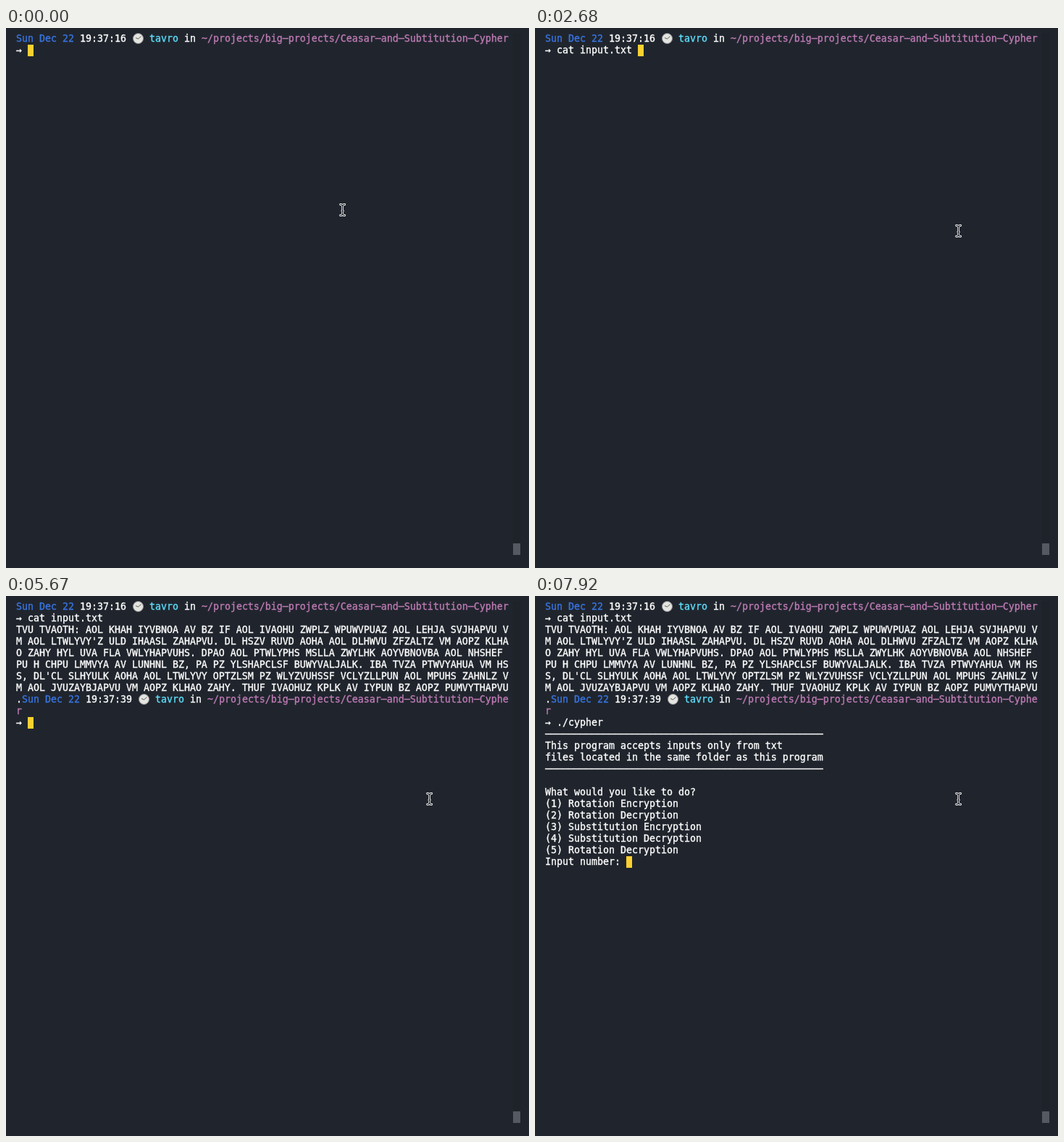
Write an HTML page that moves like this. It is 722x745 px and loops after 8000 ms.

```html
<!DOCTYPE html>
<html lang="en">
<head>
<meta charset="utf-8">
<title>Terminal</title>
<style>
  html, body { margin: 0; width: 100%; height: 100%; overflow: hidden; background: #20252d; }
  pre {
    position: absolute; left: 14px; top: 7px; margin: 0; color: #fff;
    font: 13.29px/16px "DejaVu Sans Mono", monospace;
    font-variant-ligatures: none;
    -webkit-text-stroke: .35px currentColor;
  }
  pre svg { vertical-align: top; }
  .date { color: #3875e0; }
  .user { color: #5cdcfa; }
  .path { color: #bd7ab4; }
  .dash { position: relative; top: -1px; }
  #cursor { position: absolute; width: 8px; height: 16px; background: #fdd031; }
  #track { position: absolute; left: 700px; top: 7px; width: 10px; height: 720px; background: #1e232a; }
  #thumb { position: absolute; left: 0; top: 704px; width: 10px; height: 16px; background: #555961; }
  #mouse { position: absolute; left: 0; top: 0; }
</style>
</head>
<body>
<pre id="screen"></pre>
<div id="cursor"></div>
<div id="track"><div id="thumb"></div></div>
<svg id="mouse" width="10" height="18" fill="none" stroke-linecap="round">
  <defs>
    <path id="beam" d="M1.6 1.5Q4.6 1.5 4.6 4V14Q4.6 16.5 1.6 16.5M7.6 1.5Q4.6 1.5 4.6 4M4.6 14Q4.6 16.5 7.6 16.5M3.9 10.5H5.3"/>
  </defs>
  <use href="#beam" stroke="#fff" stroke-width="2.8"/>
  <use href="#beam" stroke="#15181d" stroke-width="1.1"/>
</svg>
<script>
const LOOP = 8000, CELL = 8, ROW = 16, LEFT = 14, TOP = 7;
const $ = id => document.getElementById(id);

const clock = `<svg width="16" height="16"><circle cx="8.5" cy="7.5" r="7" fill="#e4e4e0" stroke="#8d8f91"/>
<path d="M5 6.5L8.5 8L12.5 4.5" fill="none" stroke="#5a5a5a"/></svg>`;
const span = (name, text) => `<span class="${name}">${text}</span>`;
const prompt = (time, path) =>
  `${span("date", "Sun Dec 22")} ${time} ${clock} ${span("user", "tavro")} in ${span("path", path)}\n→ `;

const dash = span("dash", "–");
const path = "~/projects/big-projects/Ceasar-and-Subtitution-Cypher".replaceAll("-", dash);
const rule = span("dash", "–".repeat(48));
const first = prompt("19:37:16", path);
const second = `${first}cat input.txt
TVU TVAOTH: AOL KHAH IYVBNOA AV BZ IF AOL IVAOHU ZWPLZ WPUWVPUAZ AOL LEHJA SVJHAPVU V
M AOL LTWLYVY'Z ULD IHAASL ZAHAPVU. DL HSZV RUVD AOHA AOL DLHWVU ZFZALTZ VM AOPZ KLHA
O ZAHY HYL UVA FLA VWLYHAPVUHS. DPAO AOL PTWLYPHS MSLLA ZWYLHK AOYVBNOVBA AOL NHSHEF
PU H CHPU LMMVYA AV LUNHNL BZ, PA PZ YLSHAPCLSF BUWYVALJALK. IBA TVZA PTWVYAHUA VM HS
S, DL'CL SLHYULK AOHA AOL LTWLYVY OPTZLSM PZ WLYZVUHSSF VCLYZLLPUN AOL MPUHS ZAHNLZ V
M AOL JVUZAYBJAPVU VM AOPZ KLHAO ZAHY. THUF IVAOHUZ KPLK AV IYPUN BZ AOPZ PUMVYTHAPVU
.${prompt("19:37:39", path.replace(/r$/, "\nr"))}`;
const menu = `${second}./cypher
${rule}
This program accepts inputs only from txt
files located in the same folder as this program
${rule}

What would you like to do?
(1) Rotation Encryption
(2) Rotation Decryption
(3) Substitution Encryption
(4) Substitution Decryption
(5) Rotation Decryption
Input number: `;

// Each step: start time, then its values
const at = (steps, t) => steps.findLast(s => s[0] <= t);
const pages = [[0, first, 1, 2], [3280, second, 10, 2], [7920, menu, 22, 14]];
const typed = [
  [0, ""], [1630, "c"], [1780, "ca"], [1930, "cat"], [2230, "cat "], [2530, "cat in"],
  [2680, "cat input.txt "], [3280, ""], [5820, "."], [5970, "./"], [7020, "./c"],
  [7170, "./cy"], [7320, "./cypher "], [7920, ""]
];
const blink = [
  [0, 1], [580, 0], [1180, 1], [3880, 0], [4480, 1], [5070, 0], [5670, 1], [6570, 0], [7020, 1]
];
const mouse = [[0, 460, 242], [140, 472, 242], [290, 580, 271]];

let shown;
function draw(now) {
  const t = now % LOOP;
  const [, page, row, col] = at(pages, t);
  const text = at(typed, t)[1];
  if (page + text !== shown) $("screen").innerHTML = shown = page + text;

  const cursor = $("cursor").style;
  cursor.left = LEFT + (col + text.length) * CELL + "px";
  cursor.top = TOP + row * ROW + "px";
  cursor.opacity = at(blink, t)[1];

  const [, x, y] = at(mouse, t);
  $("mouse").style.transform = `translate(${x}px, ${y}px)`;
  requestAnimationFrame(draw);
}
draw(0);
</script>
</body>
</html>
```
